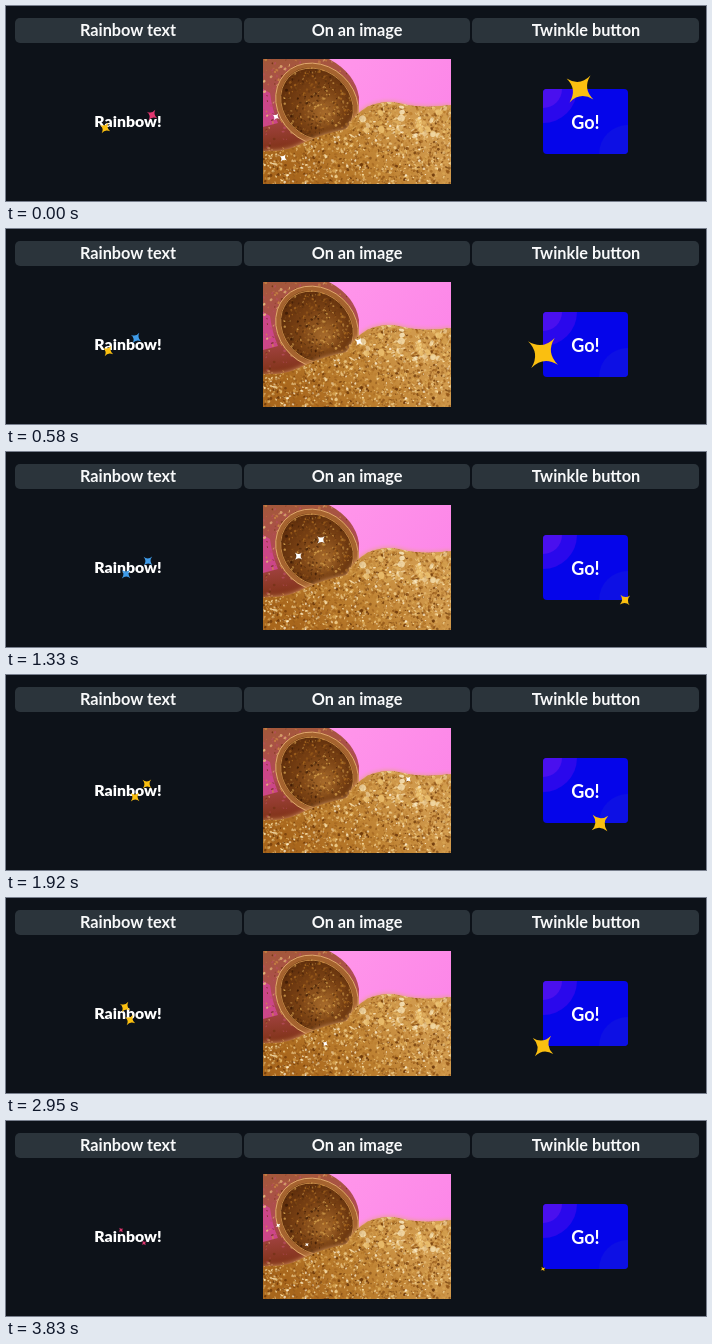
Animation of 700 by 195 pixels, one loop 3930 ms. Source, as an HTML page with a canvas:

```html
<!DOCTYPE html>
<html lang="en">
<head>
<meta charset="utf-8">
<title>Twinkles</title>
<style>
  html, body { margin: 0; width: 100%; height: 100%; overflow: hidden; background: #0d1219; }
  canvas { position: absolute; left: 257px; top: 53px; }
  svg { position: absolute; left: 0; top: 0; }
  text { font: 700 16.3px Lato, "Open Sans", sans-serif; text-anchor: middle; fill: #fff; }
  .tab rect { fill: #2b343b; }
  .tab text { fill: #f8f9fa; }
  .word { font-weight: 900; font-size: 15.8px; }
  .go { font-size: 18px; }
</style>
</head>
<body>
<canvas id="photo" width="188" height="125"></canvas>
<svg width="700" height="195" viewBox="0 0 700 195">
  <defs>
    <clipPath id="btn"><rect x="537" y="83" width="85" height="65" rx="4"/></clipPath>
  </defs>
  <g class="tab">
    <rect x="9" y="12" width="227" height="25" rx="5"/>
    <rect x="238" y="12" width="226" height="25" rx="5"/>
    <rect x="466" y="12" width="227" height="25" rx="5"/>
    <text x="122" y="30">Rainbow text</text>
    <text x="351" y="30">On an image</text>
    <text x="580" y="30">Twinkle button</text>
  </g>
  <text class="word" x="122" y="121">Rainbow!</text>
  <g clip-path="url(#btn)">
    <rect x="537" y="83" width="85" height="65" fill="#0505ea"/>
    <circle cx="537" cy="83" r="34" fill="#2a08ec"/>
    <circle cx="537" cy="83" r="19" fill="#4a10ee"/>
    <circle cx="622" cy="148" r="29" fill="#0d10e4"/>
  </g>
  <path id="edge" d="M537 83h85v65h-85z" fill="none"/>
  <text class="go" x="579.5" y="123">Go!</text>
  <g id="stars"></g>
</svg>
<script>
const LOOP = 3930, STEP = 147.5, BEAT = 4 * STEP;
const GOLD = '#fabf10', PINK = '#e0356f', BLUE = '#3f9be8', WHITE = '#fff';
const SHAPE = 'M0-1Q.1-.1 1 0Q.1.1 0 1Q-.1.1-1 0Q-.1-.1 0-1Z';

// One beat each: distance along the button edge, radius there,
// then the letters' star below and the one above
const beats = [
  { edge: 37, size: 17, below: [99, GOLD], above: [146, PINK] },
  { edge: 259, size: 19, below: [102, GOLD], above: [130, BLUE] },
  { edge: 153, size: 15, below: [120, BLUE], above: [142, BLUE] },
  { edge: 178, size: 24, below: [129, GOLD], above: [141, GOLD] },
  { edge: 26, size: 13, below: [94, BLUE] },
  { edge: 235, size: 13, below: [124, GOLD], above: [119, GOLD] },
  { edge: 235, size: 13, below: [138, PINK], above: [115, PINK] }
];

let seed = 11;
const rnd = () => (seed = seed * 16807 % 2147483647) / 2147483647;
const edge = document.getElementById('edge');
const layer = document.getElementById('stars');
const stars = [];

function addStar(x, y, r, fill, peak) {
  const el = document.createElementNS('http://www.w3.org/2000/svg', 'path');
  el.setAttribute('d', SHAPE);
  el.setAttribute('fill', fill);
  layer.append(el);
  stars.push({ el, x, y, r, peak });
}

beats.forEach(({ edge: along, size, below, above }, i) => {
  const peak = i * BEAT, late = peak + STEP / 2;
  const { x, y } = edge.getPointAtLength(along);
  addStar(x, y, size, GOLD, peak);
  addStar(below[0], 122, 9, below[1], late);
  if (above) addStar(above[0], 109, 9, above[1], late);
  for (let n = i % 2; n < 2; n++) {
    addStar(270 + rnd() * 160, 66 + rnd() * 100, 5 + rnd() * 4, WHITE, late);
  }
});

function paintPhoto() {
  const c = document.getElementById('photo').getContext('2d');
  const ellipse = (x, y, rx, ry, turn) => {
    const p = new Path2D();
    p.ellipse(x, y, rx, ry, turn, 0, 7);
    return p;
  };
  const fill = (area, style) => {
    c.fillStyle = style;
    c.fill(area);
  };
  const ring = (area, width, color) => {
    c.lineWidth = width;
    c.strokeStyle = color;
    c.stroke(area);
  };
  const glitter = (area, n, colors, x, y, w, h, size) => {
    c.save();
    c.clip(area);
    for (let i = 0; i < n; i++) {
      c.globalAlpha = .3 + rnd() * .6;
      fill(ellipse(x + rnd() * w, y + rnd() * h, .4 + rnd() * size, .4 + rnd() * size, rnd() * 3),
        colors[Math.floor(rnd() * colors.length)]);
    }
    c.restore();
  };
  const shade = (g, ...colors) => {
    colors.forEach((col, i) => g.addColorStop(i / (colors.length - 1), col));
    return g;
  };

  c.fillStyle = shade(c.createLinearGradient(90, 0, 188, 60), '#ff94ea', '#fc86e8');
  c.fillRect(0, 0, 188, 125);

  const jar = new Path2D('M0 0H66Q92 14 96 38Q96 62 84 76L0 105Z');
  fill(jar, shade(c.createLinearGradient(10, 0, 20, 95), '#a3583a', '#b24a55', '#7a3010'));
  fill(new Path2D('M0 30L7 34Q9 50 15 64L0 68Z'), '#cc4688');
  glitter(jar, 300, ['#6b2f10', '#cf8c42', '#b84f62', '#e9bd7c'], 0, 0, 96, 100, 1.2);

  const mouth = ellipse(54, 45, 42, 36, .75);
  fill(mouth, shade(c.createRadialGradient(62, 55, 2, 54, 45, 42), '#a5692a', '#7a4214', '#5a2a0a'));
  glitter(mouth, 800, ['#3f1c06', '#7a4414', '#a9681f', '#d9a650', '#59300e'], 8, 2, 92, 90, 1.1);
  ring(mouth, 5, '#a5632f');
  ring(ellipse(54, 45, 44, 38, .75), 1, '#e0a66e');
  ring(ellipse(54, 45, 39, 33, .75), .8, '#d89a52');

  const pile = new Path2D('M0 92Q22 94 40 84Q62 74 84 70Q90 56 104 48Q122 40 140 45Q160 50 188 46V125H0Z');
  c.save();
  c.shadowColor = '#e2a56c';
  c.shadowBlur = 5;
  fill(pile, shade(c.createLinearGradient(40, 125, 130, 45), '#a8661c', '#bd8030', '#d0994c'));
  c.restore();
  glitter(pile, 2300, ['#6b3608', '#95591a', '#b87a2a', '#dfae5a', '#f3d495', '#a36520'], 0, 42, 188, 83, 1.3);
  glitter(pile, 110, ['#edc271', '#d4a04e', '#fbe9be'], 88, 42, 100, 36, 3.2);
  glitter(pile, 260, ['#fff6dc', '#ffe9b0'], 0, 62, 188, 63, 1);
}

function draw() {
  const t = performance.now() % LOOP;
  const now = Math.floor((t + 10) / STEP) * STEP;
  for (const { el, x, y, r, peak } of stars) {
    const d = now - peak;
    const size = d > -200 && d < 310 ? r * Math.exp(-Math.abs(d) / 190) : 0;
    el.setAttribute('transform', `translate(${x} ${y}) rotate(${38 + d * .07}) scale(${size})`);
  }
  requestAnimationFrame(draw);
}

paintPhoto();
draw();
</script>
</body>
</html>
```
